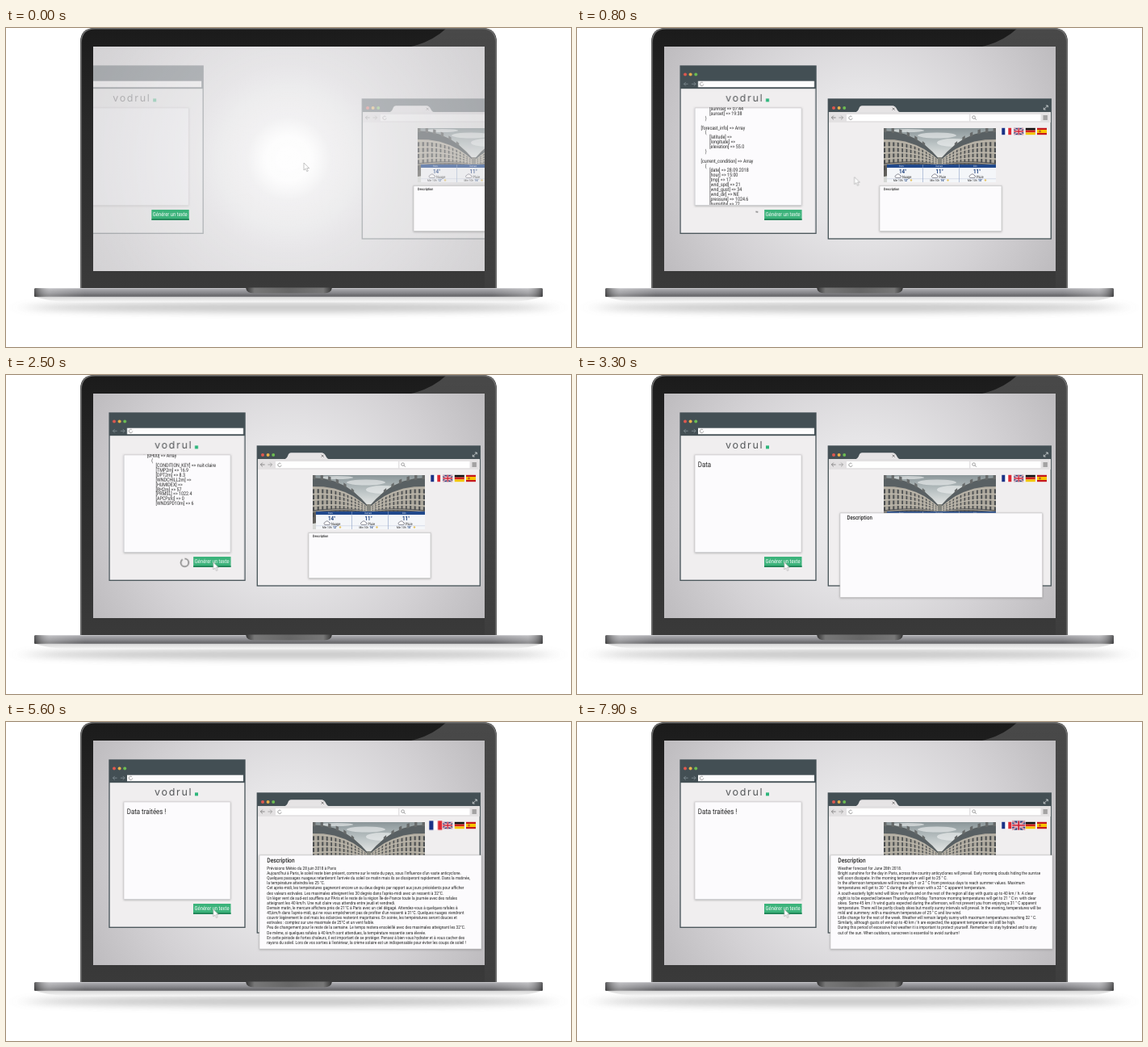
Recreate the animation shown at these times as an HTML page. Size 700x395 px, loop 8 s.

```html
<!DOCTYPE html>
<html lang="fr">
<head>
<meta charset="utf-8">
<title>Génération de texte</title>
<style>
html, body { margin: 0; width: 100%; height: 100%; overflow: hidden; background: #fff; }
svg { display: block; width: 100%; height: 100%; }
text { font-family: Roboto, "Liberation Sans", sans-serif; fill: #222; white-space: pre; text-rendering: geometricPrecision; }
.brand { font-family: Inter, sans-serif; font-size: 12.5px; letter-spacing: 1.7px; fill: #55585a; }
</style>
</head>
<body>
<svg id="stage" viewBox="0 0 700 395"></svg>
<script>
const LOOP = 8000;
const SQUEEZE = 0.84;
const LINE = 5.88;
const SCROLL = 0.1312; // px per ms

const rect = (x, y, w, h, fill, more = '') =>
  `<rect x="${x}" y="${y}" width="${w}" height="${h}" fill="${fill}" ${more}/>`;
const path = (d, fill, more = '') => `<path d="${d}" fill="${fill}" ${more}/>`;
const line = (d, color, w = 1) => path(d, 'none', `stroke="${color}" stroke-width="${w}"`);
const dot = (x, y, r, fill) => `<circle cx="${x}" cy="${y}" r="${r}" fill="${fill}"/>`;
const text = (x, y, size, str, more = '') =>
  `<text transform="translate(${x} ${y}) scale(${SQUEEZE} 1)" font-size="${size}" ${more}>${str.replace(/>/g, '&gt;')}</text>`;
const group = (id, body, more = '') => `<g id="${id}" ${more}>${body}</g>`;
const stops = list => list.map(([o, c, a = 1]) => `<stop offset="${o}" stop-color="${c}" stop-opacity="${a}"/>`).join('');
const linear = (id, x2, y2, list) => `<linearGradient id="${id}" x2="${x2}" y2="${y2}">${stops(list)}</linearGradient>`;
const radial = (id, r, list) =>
  `<radialGradient id="${id}" gradientUnits="userSpaceOnUse" cx="350" cy="162" r="${r}">${stops(list)}</radialGradient>`;

const defs = `<defs>
${linear('lid', 0, 1, [[0, '#1b1b1b'], [.4, '#2a2a2a'], [1, '#3a3a3a']])}
${linear('gloss', 0, 1, [[0, '#fff', .2], [1, '#fff', .02]])}
${linear('base', 0, 1, [[0, '#d2d2d5'], [.14, '#a6a6aa'], [.6, '#838387'], [.85, '#68686b'], [1, '#8f8f92']])}
${linear('ends', 1, 0, [[0, '#222', .6], [.03, '#fff', .25], [.1, '#fff', 0], [.9, '#fff', 0], [.97, '#fff', .25], [1, '#222', .6]])}
${linear('lip', 0, 1, [[0, '#d2d2d2'], [1, '#f8f8f8']])}
${linear('notch', 1, 0, [[0, '#333'], [.1, '#777'], [.5, '#666'], [.9, '#777'], [1, '#333']])}
${linear('sky', 0, 1, [[0, '#8b9699'], [.3, '#bcc4c5'], [.55, '#e2e4e3'], [1, '#d5d7d4']])}
${radial('wall', 285, [[0, '#efeef0'], [.3, '#e6e5e7'], [.65, '#d3d1d4'], [1, '#bcbabd']])}
${radial('glow', 285, [[0, '#fff'], [.1, '#fff', .9], [.18, '#fff', .4], [.4, '#fff', .24], [1, '#fff', .34]])}
<filter id="soft" x="-10%" y="-150%" width="120%" height="400%"><feGaussianBlur stdDeviation="14 4"/></filter>
<filter id="drop" x="-10%" y="-10%" width="120%" height="125%"><feDropShadow dx="0" dy=".6" stdDeviation="1.1" flood-color="#555" flood-opacity=".5"/></filter>
<clipPath id="screen">${rect(108, 23, 485, 278, '#000')}</clipPath>
<clipPath id="box">${rect(146.5, 98, 131, 121, '#000')}</clipPath>
<clipPath id="frame">${rect(380, 124, 139, 67, '#000')}</clipPath>
</defs>`;

const laptop = `
<ellipse cx="350" cy="346" rx="325" ry="6" fill="#777" opacity=".42" filter="url(#soft)"/>
${path('M36 332H664Q655 338 615 339.5H85Q45 338 36 332Z', 'url(#lip)')}
${path('M92 322V18Q92 0 110 0H590Q608 0 608 18V322Z', 'url(#lid)')}
${path('M546 0H590Q607 0 607 18V322H593V23H502Q528 17 546 0Z', 'url(#gloss)')}
${line('M93 322V18Q93.5 .8 110 .8H590Q606.5 .8 607 18V322', '#6f6f6f', 1.6)}
${rect(35, 322, 630, 11, 'url(#base)', 'rx="1.5"')}${rect(35, 322, 630, 11, 'url(#ends)', 'rx="1.5"')}
${path('M297 321.5H404Q403 328.5 394 328.5H307Q298 328.5 297 321.5Z', 'url(#notch)')}`;

const lights = (x, y) => ['#e0584f', '#e8b04a', '#6cbd52'].map((c, i) => dot(x + i * 6.6, y, 2, c)).join('');
const arrow = (x, y, dir, c) => line(`M${x - 2.6 * dir} ${y}H${x + 2.6 * dir}m${-2.4 * dir} -2.4l${2.4 * dir} 2.4l${-2.4 * dir} 2.4`, c, .8);
const reload = (x, y) => line(`M${x + 1.6} ${y - 1.4}A2.2 2.2 0 1 0 ${x + 2.2} ${y + .4}`, '#777', .7);
const shell = (x, y, w, h) => rect(x, y, w, h, '#f0eeef', 'stroke="#465257" stroke-width="1.3"');

const leftChrome = shell(128, 47, 168, 207.3) + rect(128, 47, 168, 28.2, '#434f54') + lights(134, 57.5)
  + arrow(135, 69.3, -1, '#859196') + arrow(144.5, 69.3, 1, '#859196')
  + rect(150, 65.7, 144, 7.6, '#fdfdfd') + reload(154.5, 69.3)
  + '<text class="brand" x="184" y="91">vodrul</text>' + rect(234, 87.4, 4, 4, '#2fb67c')
  + rect(146, 99, 132, 120.5, '#fcfbfd', 'stroke="#c9c8ca" stroke-width=".6" filter="url(#drop)"');

const button = rect(232, 225, 46.5, 13, '#3cb37b') + rect(232, 236, 46.5, 2, '#23885a')
  + text(233.6, 233.4, 7, 'Générer un texte', 'style="fill:#fff"');

const rightChrome = shell(311.3, 88, 276, 173) + rect(311.3, 88, 276, 16.2, '#434f54')
  + path('M344 104.5Q348 104 350 98Q351 96.3 353 96.3H391Q394 96.3 396 100Q398 104.5 402 104.5Z', '#e6e4e5')
  + line('M390.7 98.7l3 3m0 -3l-3 3', '#555', .7) + lights(318, 99)
  + line('M578.3 101l5 -5m-2.4 0h2.4v2.4m-5 .2v2.4h2.4', '#d8dcde', .8)
  + rect(312, 104.2, 275, 12.8, '#e3e1e2') + arrow(318, 111, -1, '#777') + arrow(327, 111, 1, '#999')
  + rect(334, 107, 152, 8.2, '#fff') + reload(339, 111.2) + rect(487.5, 107, 87, 8.2, '#fff')
  + '<circle cx="491.6" cy="110.6" r="1.8" fill="none" stroke="#777" stroke-width=".7"/>' + line('M493 112l1.8 1.8', '#777', .7)
  + line('M577.5 109h5.4m-5.4 2h5.4m-5.4 2h5.4', '#555', .9);

// Facade running from an outer edge towards the end of the street
function facade(outer, inner) {
  const at = (u, v) => {
    const top = 135 + 27 * u ** 2.4, low = 184 - 12 * u;
    return [outer + (inner - outer) * u, top + (low - top) * v].map(n => n.toFixed(1)).join(' ');
  };
  const along = v => [0, .2, .4, .6, .75, .9, 1].map(u => at(u, v));
  const slab = (v0, v1, c) => path(`M${[...along(v0), ...along(v1).reverse()].join('L')}Z`, c);
  let out = slab(-.16, 1, '#aca79c') + slab(-.16, .06, '#596063') + slab(.66, 1, '#605e5a');
  for (let r = 0; r < 5; r++) {
    const v = .13 + r * .15;
    out += line(`M${along(v - .03).join('L')}`, '#d2cdc2', .6);
    for (let c = 0; c < 14; c++) {
      const u = 1 - (1 - c / 14) ** 1.2, d = .032 * (1 - u * .5);
      out += path(`M${at(u, v)}L${at(u + d, v)}L${at(u + d, v + .11)}L${at(u, v + .11)}Z`, '#4b4e50');
    }
  }
  for (let c = 0; c < 6; c++) out += path(`M${at(c / 7, -.25)}L${at(c / 7 + .05, -.25)}L${at(c / 7 + .05, -.12)}L${at(c / 7, -.12)}Z`, '#676a6a');
  return out;
}

const cloud = (x, y) => path(`M${x} ${y + 2}a1.7 1.7 0 0 1 .6 -3.2a2.4 2.4 0 0 1 4.4 .2a1.5 1.5 0 0 1 0 3Z`, '#fff', 'stroke="#445" stroke-width=".6"');
const forecast = [[399, 'Paris', '14°', 'Nuage', 12], [444.5, 'Demain', '11°', 'Pluie', 16], [491, 'Dim', '11°', 'Pluie', 15]]
  .map(([x, day, temp, sky, min]) => text(x, 172, 3, day, 'style="fill:#fff"') + text(x, 179.5, 7.4, temp, 'font-weight="700" style="fill:#1c3f7c"')
    + cloud(x - 4, 183.4) + text(x + 4, 185.6, 4.6, sky) + text(x - 7, 190, 3.8, 'Min 10h')
    + text(x + 6, 190, 4.2, min + '°', 'font-weight="700" style="fill:#1c3f7c"') + dot(x + 15, 188.5, 1.2, '#e5c365')).join('');
const photo = `<g clip-path="url(#frame)">${rect(380, 124, 139, 67, 'url(#sky)')}
<g fill="#f1f3f3" opacity=".6"><ellipse cx="446" cy="133" rx="24" ry="3.5"/><ellipse cx="466" cy="142" rx="20" ry="5"/><ellipse cx="410" cy="127" rx="20" ry="2"/></g>
${rect(440, 160, 18, 14, '#85867f')}${facade(380, 447)}${facade(519, 452)}
${rect(384, 169, 135, 4.2, '#21498c')}${rect(384, 173, 135, 18, '#f4f6f9')}
${rect(384, 186.6, 135, .5, '#b9c4d6')}${rect(428, 169, .6, 22, '#8ea4c6')}${rect(473, 169, .6, 22, '#8ea4c6')}${forecast}</g>`;

const bands = (colors, upright) => colors.map((c, i) => upright ? rect(-6 + i * 4, -4.2, 4, 8.4, c) : rect(-6, -4.2 + i * 2.8, 12, 2.8, c)).join('');
const cross = 'M0 -4.2V4.2M-6 0H6', saltire = 'M-6 -4.2L6 4.2M-6 4.2L6 -4.2';
const flags = [
  ['de', 561.8, bands(['#111', '#d0201c', '#f3c500'])],
  ['es', 576, rect(-6, -4.2, 12, 8.4, '#c5171d') + rect(-6, -2, 12, 4, '#f8c300') + rect(-3.6, -1.3, 2.2, 2.6, '#b5542c')],
  ['fr', 532.3, bands(['#1b3286', '#fff', '#dd2a34'], true)],
  ['uk', 547.2, rect(-6, -4.2, 12, 8.4, '#1a2a6a') + line(saltire, '#fff', 1.5) + line(saltire, '#cf2337', .6) + line(cross, '#fff', 2.6) + line(cross, '#cf2337', 1.5)]
].map(([id, x, art]) => `<g transform="translate(${x} 128)">${group(id, art)}</g>`).join('');

const dump = `Array
(
 [location] => Array
  (
  [city] => Paris
  [country] => France
  [timezone] => 2
  )

 [sun_info] => Array
  (
  [sunrise] => 07:44
  [sunset] => 19:38
 )

[forecast_info] => Array
 (
  [latitude] =>
  [longitude] =>
  [elevation] => 55.0
 )

[current_condition] => Array
 (
  [date] => 28.09.2018
  [hour] => 15:00
  [tmp] => 17
  [wnd_spd] => 21
  [wnd_gust] => 34
  [wnd_dir] => NE
  [pressure] => 1024.6
  [humidity] => 72
  [condition] => Eclaircies
  [condition_key] => eclaircies

 )

[fcst_day_0] => Array
 (
  [date] => 28.09.2018
  [day_short] => Ven.
  [day_long] => Vendredi
  [tmin] => 13
  [tmax] => 19
  [condition] => Eclaircies
  [condition_key] => eclaircies

  [hourly_data] => Array
   (
    [0H00] => Array
     (
      [CONDITION_KEY] => nuit-claire
      [TMP2m] => 16.9
      [DPT2m] => 8.3
      [WNDCHILL2m] =>
      [HUMIDEX] =>
      [RH2m] => 57
      [PRMSL] => 1022.4
      [APCPsfc] => 0
      [WNDSPD10m] => 6`.split('\n').map((s, i) => {
  const body = s.trimStart();
  return text(153.5 + (s.length - body.length) * 5.35, 102 + (i - 11) * LINE, 6.35, body);
}).join('');

const french = `Prévisions Météo du 28 juin 2018 à Paris
Aujourd'hui à Paris, le soleil reste bien présent, comme sur le reste du pays, sous l'influence d'un vaste anticyclone.
Quelques passages nuageux retarderont l'arrivée du soleil ce matin mais ils se dissiperont rapidement. Dans la matinée,
la température atteindra les 25 °C.
Cet après-midi, les températures gagneront encore un ou deux degrés par rapport aux jours précédents pour afficher
des valeurs estivales. Les maximales atteignent les 30 degrés dans l'après-midi avec un ressenti à 32°C.
Un léger vent de sud-est soufflera sur PAris et le reste de la région Île-de-France toute la journée avec des rafales
atteignant les 40 km/h. Une nuit claire vous attendra entre jeudi et vendredi.
Demain matin, le mercure affichera près de 21°C à Paris avec un ciel dégagé. Attendez-vous à quelques rafales à
45,km/h dans l'après-midi, qui ne vous empêcheront pas de profiter d'un ressenti à 31°C. Quelques nuages viendront
couvrir légèrement le ciel mais les éclaircies resteront majoritaires. En soirée, les températures seront douces et
estivales : comptez sur une maximale de 25°C et un vent faible.
Peu de changement pour le reste de la semaine. Le temps restera ensoleillé avec des maximales atteignant les 32°C.
De même, si quelques rafales à 40 km/h sont attendues, la température ressentie sera élevée.
En cette période de fortes chaleurs, il est important de se protéger. Pensez à bien vous hydrater et à vous cacher des
rayons du soleil. Lors de vos sorties à l'extérieur, la crème solaire est un indispensable pour éviter les coups de soleil !`;
const english = `Weather forecast for June 28th 2018.
Bright sunshine for the day in Paris, across the country anticyclones will prevail. Early morning clouds hiding the sunrise
will soon dissipate. In the morning temperature will get to 25 ° C.
In the afternoon temperature will increase by 1 or 2 ° C from previous days to reach summer values. Maximum
temperatures will get to 30 ° C during the afternoon with a 32 ° C apparent temperature.
A south-easterly light wind will blow on Paris and on the rest of the region all day with gusts up to 40 km / h. A clear
night is to be expected between Thursday and Friday. Tomorrow morning temperatures will get to 21 ° C in  with clear
skies. Some 45 km / h wind gusts expected during the afternoon, will not prevent you from enjoying a 31 ° C apparent
temperature. There will be partly cloudy skies but mostly sunny intervals will prevail. In the evening, temperatures will be
mild and summery: with a maximum temperature of 25 ° C and low wind.
Little change for the rest of the week. Weather will remain largely sunny with maximum temperatures reaching 32 ° C.
Similarly, although gusts of wind up to 40 km / h are expected, the apparent temperature will still be high.
During this period of excessive hot weather it is important to protect yourself. Remember to stay hydrated and to stay
out of the sun. When outdoors, sunscreen is essential to avoid sunburn!`;
const story = (id, str) => group(id, str.split('\n').map((s, i) => text(323.3, 183 + i * 6.12, 5.67, s)).join(''));

const left = group('left', group('leftFade', leftChrome)
  + `<g clip-path="url(#box)">${group('dump', dump)}</g>`
  + group('data', text(149.8, 113.8, 9.4, 'Data')) + group('done', text(149.8, 113.8, 9.4, 'Data traitées !'))
  + '<circle id="spinner" cx="221.5" cy="232.3" r="4.9" fill="none" stroke="#8b8b8b" stroke-width="1.7" pathLength="100" stroke-dasharray="100 200" transform="rotate(-90 221.5 232.3)"/>'
  + button);
const right = group('right', group('rightFade', rightChrome + flags) + group('photo', photo)
  + rect(375, 195.5, 151, 56, '#fcfbfd', 'id="panel" stroke="#bbb" stroke-width=".5" filter="url(#drop)"')
  + group('title', text(0, 0, 8, 'Description', 'font-weight="500"')) + story('french', french) + story('english', english));
const cursor = group('cursor', path('M0 0V9L2.1 7.1L3.8 10.6L5.3 9.9L3.7 6.5H6.7Z', '#fff', 'stroke="#8a8a8a" stroke-width=".5"'));

document.getElementById('stage').innerHTML = defs + laptop + `<g clip-path="url(#screen)">
${rect(108, 23, 485, 278, 'url(#wall)')}${rect(108, 23, 485, 278, 'url(#glow)', 'id="flash"')}${left}${right}${cursor}</g>`;

// Steps are [ms, value, easing]; the first and last values are held to the ends of the loop
function play(id, prop, steps) {
  const [first, last] = [steps[0], steps[steps.length - 1]];
  const frames = [[0, first[1]], ...steps, [LOOP, last[1]]].map(([ms, value, easing = 'linear']) =>
    ({ offset: ms / LOOP, easing, ...(prop ? { [prop]: value } : value) }));
  document.getElementById(id).animate(frames, { duration: LOOP, iterations: Infinity });
}
const move = (x, y, s = 1) => `translate(${x}px, ${y}px) scale(${s})`;

play('flash', 'opacity', [[0, 1], [500, 0]]);
play('left', 'transform', [[0, move(-52, 0), 'ease-out'], [450, move(0, 0)]]);
play('right', 'transform', [[0, move(130.5, 0), 'ease-out'], [450, move(0, 0)]]);
play('leftFade', 'opacity', [[0, .32], [400, 1]]);
play('rightFade', 'opacity', [[0, .32], [400, 1]]);
play('photo', 'opacity', [[0, .6], [400, 1]]);
play('cursor', 'transform', [[0, move(369, 167)], [500, move(363, 174), 'cubic-bezier(.5, 0, .4, 1)'], [1500, move(256.7, 231.8)]]);
play('dump', 'opacity', [[200, 0], [350, 1], [3000, 1], [3000, 0]]);
play('dump', 'transform', [[300, move(0, 500 * SCROLL)], [3000, move(0, -2200 * SCROLL)]]);
play('spinner', 'strokeDashoffset', [[600, 100], [2700, 0]]);
play('spinner', 'opacity', [[600, 0], [600, 1], [2800, 1], [2950, 0]]);
play('data', 'opacity', [[3000, 0], [3150, 1], [3900, 1], [3900, 0]]);
play('done', 'opacity', [[3900, 0], [3900, 1]]);
play('panel', '', [
  [3000, { x: '375px', y: '195.5px', width: '151px', height: '56px' }, 'ease'],
  [3600, { x: '314px', y: '165px', width: '275px', height: '116px' }]]);
play('title', 'transform', [[3000, move(380, 200.6, .56), 'ease'], [3600, move(323.3, 174)]]);
play('french', 'opacity', [[4600, 0], [5000, 1], [6200, 1], [6450, 0]]);
play('english', 'opacity', [[6400, 0], [6800, 1]]);
play('fr', 'transform', [[4500, 'scale(1)'], [4700, 'scale(1.33)'], [6200, 'scale(1.33)'], [6400, 'scale(1)']]);
play('uk', 'transform', [[6200, 'scale(1)'], [6400, 'scale(1.33)']]);
</script>
</body>
</html>
```
